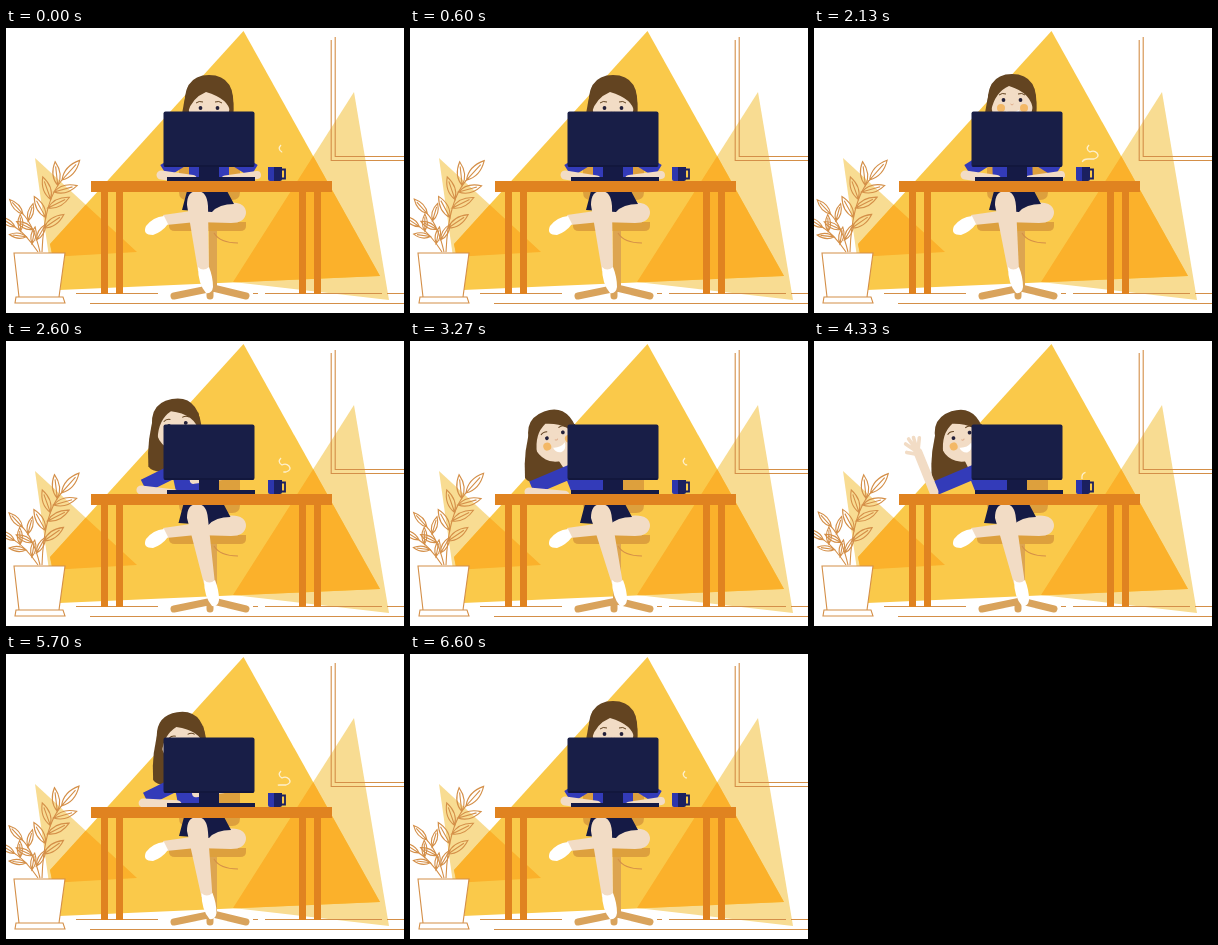
An HTML page for the animation above (6630 ms loop, 398x285 px).

```html
<!DOCTYPE html>
<html lang="en">
<head>
<meta charset="utf-8">
<title>Waving from the desk</title>
<style>
html, body { margin: 0; height: 100%; overflow: hidden; background: #fff; }
svg { display: block; width: 100vw; height: 100vh; }
.line { fill: none; stroke: #d48f48; stroke-width: 1.1; }
.skin { fill: #f2dcc5; }
.limb { fill: none; stroke: #f2dcc5; stroke-linecap: round; }
.shirt { fill: #333bb9; }
.sleeve { fill: none; stroke: #333bb9; stroke-width: 14; }
.hair { fill: #634421; }
.navy { fill: #151a45; }
.wood { fill: #e08320; }
.chair { fill: #dda03d; }
</style>
</head>
<body>
<svg viewBox="0 0 398 285">
  <defs>
    <clipPath id="bigClip"><path d="M237.500 3L374 248L53 262L44 216Z"/></clipPath>
    <g id="sides"><path d="M348 64L383 272L227 254Z"/><path d="M29 130L131 224L43 229Z"/></g>
  </defs>

  <use href="#sides" fill="#f8dc92"/>
  <path d="M237.500 3L374 248L53 262L44 216Z" fill="#fac94a"/>
  <use href="#sides" fill="#fbb12b" clip-path="url(#bigClip)"/>

  <path class="line" d="M325.200 12V132.500H398M329.200 9V128.500H398"/>
  <path class="line" d="M70 265.500H152M247 265.500H252M259 265.500H376M381 265.500H398M84 275.500H398"/>
  <g id="plant" class="line"></g>
  <path class="line" style="fill:#fff" d="M8 225H59L53 269H13ZM10 269H57L59 275H9Z"/>

  <!-- chair -->
  <path class="chair" d="M173 135H234V164Q234 172 226 172H181Q173 172 173 164Z"/>
  <path class="chair" d="M163 194H240V198Q240 203 234 203H169Q163 203 163 198Z"/>
  <path d="M203 203H211V262H203Z" fill="#dda550"/>
  <path d="M207 260L168 268M207 260L240 268M204 261V268" fill="none" stroke="#d9a35c" stroke-width="7" stroke-linecap="round"/>
  <path class="line" d="M208 205Q214 215 232 215"/>

  <!-- legs -->
  <path class="skin" d="M157 187L185 183L218 175Q240 172 240 185Q239 195 225 195L190 194L160 197Z"/>
  <path d="M158 188Q147 189 140 198Q136 207 147 207Q156 204 162 196Z" fill="#fff"/>
  <path id="skirt" class="navy" d="M181 163H221L228 176Q213 176 206 184L176 182Z"/>
  <path id="shin" class="skin"/>
  <path id="shoe" fill="#fff"/>

  <!-- upper body -->
  <path id="torso" class="shirt"/>
  <path id="backHair" class="hair" d="M-21 -14Q-30 15 -28 42Q-24 48 -12 47L20 38Q28 15 22 -12Z"/>
  <path id="neck" class="limb" stroke-width="13"/>
  <path id="sleeveR" class="sleeve"/>
  <path id="foreR" class="limb" stroke-width="8"/>
  <path id="sleeveL" class="sleeve"/>
  <path id="foreL" class="limb" stroke-width="9"/>
  <path id="hand" class="limb" stroke-width="3.600" d="M0 0L13 -7M1 0L16 -2M1 0L15 3M0 0L12 8M-2 -1L5 -10M0 0L6 0"/>
  <g id="head">
    <ellipse class="skin" cx="0" cy="4" rx="21" ry="22"/>
    <g id="features">
      <g fill="#f3b866"><circle cx="-11" cy="8" r="4"/><circle cx="12" cy="8" r="4"/></g>
      <g fill="#23203a"><circle cx="-8.500" cy="0" r="1.900"/><circle cx="8.500" cy="0" r="1.900"/></g>
      <path d="M-13 -5Q-10 -7.500 -6 -6M6 -6Q10 -7.500 13 -5" fill="none" stroke="#634421"/>
      <path d="M-1.500 4Q0 6 1.500 4" fill="none" stroke="#dfae8d"/>
      <path d="M-6 11Q1 14 7 10Q6 18 0 18Q-5 17 -6 11Z" fill="#fff"/>
    </g>
    <path id="fringe" class="hair"/>
  </g>

  <!-- desk -->
  <path class="navy" d="M193 138H213V149H249V154H161V149H193Z"/>
  <rect x="157.500" y="83.400" width="91" height="55.600" rx="2" fill="#181e47"/>
  <path d="M158.500 138H247.500" stroke="#10143a" stroke-width="1.600"/>
  <path d="M262 139H269V153H264Q262 153 262 151Z" fill="#2d36ad"/>
  <path d="M268 139H276V151Q276 153 274 153H268Z" fill="#1b2060"/>
  <path d="M275 141.500H279V150.500H275" fill="none" stroke="#1b2060" stroke-width="1.800"/>
  <path id="steam" pathLength="100" d="M268 138Q267 131 274 131H280Q286 129 283 125Q280 122 276 124Q271 121 275 117" fill="none" stroke="#fdf0cd" stroke-width="1.300"/>
  <path class="wood" d="M85 153H326V164H315V266H308V164H300V266H293V164H117V266H110V164H102V266H95V164H85Z"/>
</svg>

<script>
const LOOP = 6630, STEAM = 3315;
const $ = id => document.getElementById(id);
const set = (id, value, name = 'd') => $(id).setAttribute(name, value);
const move = (id, value) => set(id, value, 'transform');
const rad = deg => deg * Math.PI / 180;

function leaf(x, y, angle, size) {
  const w = size * .3, m = size * .45;
  return `<path transform="translate(${x} ${y}) rotate(${angle})" d="M0 0Q${m} ${-w} ${size} 0Q${m} ${w} 0 0H${size * .8}"/>`;
}

// A quadratic stem with alternating leaves and one at the tip.
function branch(id, [x0, y0], [x1, y1], [x2, y2], count, size) {
  let out = `<path d="M${x0} ${y0}Q${x1} ${y1} ${x2} ${y2}"/>`;
  for (let i = 0; i <= count; i++) {
    const u = .25 + .75 * i / count, v = 1 - u;
    const x = v * v * x0 + 2 * u * v * x1 + u * u * x2;
    const y = v * v * y0 + 2 * u * v * y1 + u * u * y2;
    const dir = Math.atan2(v * (y1 - y0) + u * (y2 - y1), v * (x1 - x0) + u * (x2 - x1)) * 180 / Math.PI;
    out += leaf(x, y, dir + (i === count ? 0 : i % 2 ? -40 : 48), i === count ? size * 1.1 : size);
  }
  $('plant').innerHTML += `<g id="${id}">${out}</g>`;
}
branch('stemR', [36, 224], [38, 172], [56, 152], 6, 24);
branch('stemM', [34, 224], [28, 198], [17, 186], 3, 18);
branch('stemL', [32, 224], [20, 206], [9, 199], 3, 17);

function limb(id, x, y, angle, length) {
  const hx = x + length * Math.cos(rad(angle)), hy = y + length * Math.sin(rad(angle));
  set(id, `M${x} ${y}L${hx} ${hy}`);
  return [hx, hy];
}

function draw(t) {
  const ease = (a, b, time = t) => {
    const u = Math.min(1, Math.max(0, (time - a) / (b - a)));
    return u * u * (3 - 2 * u);
  };
  const back = ease(5350, 6050);
  const up = ease(1500, 2000) - back;
  const lean = ease(2250, 2950) - back;
  const raise = ease(3550, 4200) - ease(5250, 5750);
  const turn = ease(3300, 5000) - back;
  const typing = (1 - up) * Math.sin(t * Math.PI * 2 * 24 / LOOP);

  // head
  const hx = 203 - 5 * up - 55 * lean + 4 * turn;
  const hy = 73 - up + 23 * lean;
  const look = 7 * (1 - up);
  move('head', `translate(${hx} ${hy}) rotate(${-20 * lean + 2 * turn})`);
  move('features', `translate(${2 * lean} ${look})`);
  move('backHair', `translate(${hx} ${hy})`);
  const part = -14 + look * .7;
  set('fringe', `M-24 12Q-28 -26 0 -26Q28 -26 24 12L21 11Q20 ${part + 7} -3 ${part}Q-17 ${part + 6} -21 11Z`);

  // torso
  const sx = 203 - 5 * up - 28 * lean, wx = 203 - 4 * up - 14 * lean;
  set('torso', `M${sx - 20} 122H${sx + 20}L${wx + 20} 160H${wx - 20}Z`);
  set('neck', `M${hx + 9 * lean} ${hy + 18}L${sx - 8 * lean} 128`);

  // arms
  const ex = 158 - 4 * up - 32 * lean, ey = 143 + 4 * lean;
  set('sleeveL', `M${182 - 4 * up - 11 * lean} 128L${ex} ${ey}`);
  const wave = -107 - 5 * Math.cos((t - 4330) * Math.PI * 3 / 740);
  const rest = 8 - 3 * lean + typing;
  const angle = rest + (wave - rest) * raise;
  const [px, py] = limb('foreL', ex - 3 + raise, ey + 4, angle, 32 + 4 * lean + 7 * raise);
  move('hand', `translate(${px} ${py}) rotate(${angle - 6}) scale(${.01 + .99 * raise})`);

  const rx = 248 - 4 * up - 55 * lean, ry = 143 - 25 * lean;
  set('sleeveR', `M${224 - 4 * up - 40 * lean} ${128 - 8 * lean}L${rx} ${ry}`);
  limb('foreR', rx + 3, ry + 4, 172 + typing, 32);

  // legs
  const foot = 198 + 2 * up + 8 * lean - 3 * turn;
  move('skirt', `translate(${-up - 5 * lean})`);
  set('shin', `M181 177Q181 163 191 163Q201 163 202 178L${foot + 5} 243H${foot - 6}Z`);
  set('shoe', `M${foot - 6} 239Q${foot - 1} 244 ${foot + 5} 239Q${foot + 9} 249 ${foot + 9} 259Q${foot + 8} 266 ${foot + 2} 265Q${foot - 6} 256 ${foot - 6} 239Z`);

  // steam draws on from the cup, then fades away upward
  const c = (t + STEAM - 150) % STEAM + 150;
  const tail = 100 * ease(1700, 4000, c), tip = 100 * ease(650, 1900, c);
  set('steam', `0 ${tail} ${Math.max(0, tip - tail)} 999`, 'stroke-dasharray');

  const sway = Math.sin(t / LOOP * Math.PI * 4);
  move('stemL', `rotate(${sway} 32 224)`);
  move('stemM', `rotate(${sway * .7} 34 224)`);
  move('stemR', `rotate(${sway * .4} 36 224)`);
}

function tick() {
  draw(performance.now() % LOOP);
  requestAnimationFrame(tick);
}
tick();
</script>
</body>
</html>
```
